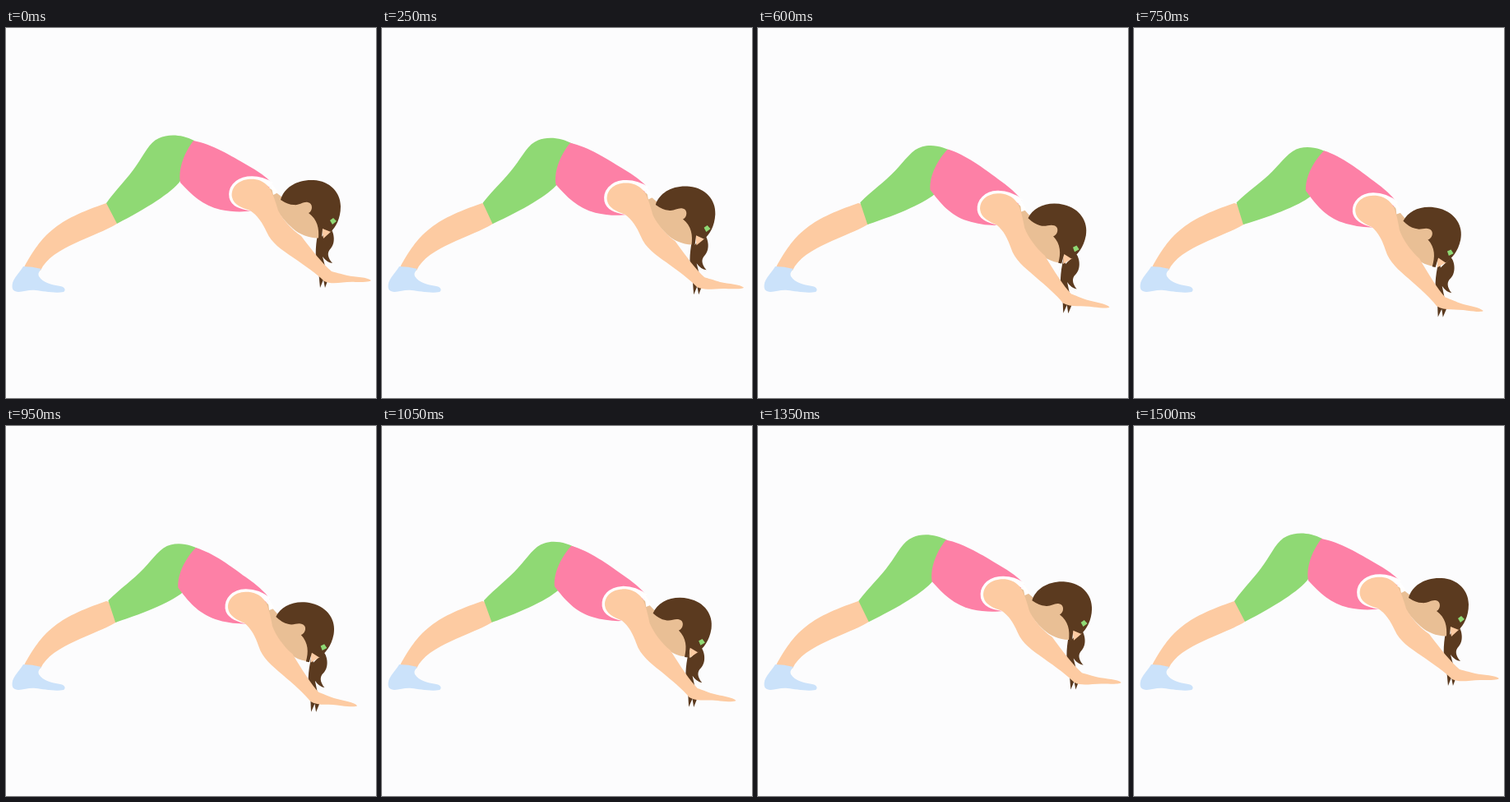
Animation of 450 by 450 pixels, one loop 1550 ms. Source, as an HTML page:

```html
<!DOCTYPE html>
<html lang="en">
<head>
<meta charset="utf-8">
<title>Stretch</title>
<style>
  html, body { margin: 0; height: 100%; overflow: hidden; background: #fcfcfd; }
  svg { display: block; width: 100%; height: 100%; }
  .skin { fill: #fdcba2; }
  .shade { fill: #e9bf95; }
  .hair { fill: #5b3a1f; }
  .green { fill: #8fd974; }
  .pink { fill: #fd80a6; }
  .sock { fill: #cbe2fa; }
  .strap { fill: none; stroke: #fff; stroke-width: 7; }
</style>
</head>
<body>
<svg viewBox="0 0 450 450">
  <path class="skin" d="M22 291C44 251 60 234 122 213L132 216L135 238C110 254 55 266 42 295Z"/>
  <path class="sock" d="M21 290Q32 290 43 293Q38 298 40 302C45 310 55 312 66 314C72 315 73 319 70 321C60 323 45 320 36 319C28 318 22 321 15 321C7 320 7 316 8 310C10 303 17 297 21 290Z"/>
  <path id="thigh" class="green" d="M122 213C134 196 148 183 158 168C168 154 174 139 186 134C197 129 213 129 229 137L222 170L212 186C202 200 170 220 135 238Z"/>
  <path id="pony" class="hair" d="M380 246C377 260 375 277 379 292C381 300 381 308 382 316L386 306L388 316L392 305L385 278Q390 285 397 286C391 279 390 273 395 268C402 260 398 246 394 243L382 256Z"/>
  <g id="body">
    <g id="head">
      <path class="shade" d="M316 192Q328 199 340 209L374 210L383 238L384 255C372 257 358 252 349 244Q336 233 326 216Z"/>
      <path class="skin" d="M384 243L396 247L386 256Z"/>
      <path class="hair" d="M334 209C338 194 354 184 374 185C394 186 407 200 407 217C407 232 401 242 395 248L385 244L384 256L380 256C381 244 379 233 368 225C373 223 374 213 367 212C361 211 357 216 350 215Q343 215 334 209Z"/>
      <path class="green" d="M394 234L398 231L402 235L397 239Z"/>
    </g>
    <path class="pink" d="M228 137C250 141 275 156 292 166Q314 178 324 189L300 222C290 224 275 224 261 221C239 216 226 203 212 188C209 170 218 150 228 137Z"/>
    <path class="strap" d="M323 191C312 184 302 183 294 184C280 186 273 196 275 206C277 214 285 217 298 219"/>
    <path fill="#fff" d="M321 186L331 200L325 203Z"/>
    <path class="skin" d="M320 194C312 184 302 183 294 184C280 186 273 196 275 206C277 215 287 219 297 222C306 228 312 237 317 248C323 262 336 270 349 279C365 290 378 299 387 308C398 313 410 308 425 309C433 309 442 309 444 307C440 303 425 303 415 301C407 299 400 297 396 296C386 288 372 270 359 253C347 245 336 232 331 222C328 212 325 202 320 194Z"/>
  </g>
</svg>
<script>
  const LOOP = 1550, STEP = 50, LOWEST = 790, RETURN = 1520;
  const [thigh, pony, body, head] =
    ['thigh', 'pony', 'body', 'head'].map(id => document.getElementById(id));
  const ease = u => (1 - Math.cos(Math.PI * u)) / 2;
  const place = (part, angle, x, y, dx = 0, dy = 0) =>
    part.setAttribute('transform', `translate(${dx} ${dy}) rotate(${angle} ${x} ${y})`);

  function bend(t) {
    if (t < LOWEST) return ease(t / LOWEST);
    return 1 - ease(Math.min(1, (t - LOWEST) / (RETURN - LOWEST)));
  }

  function draw(now) {
    const b = bend(Math.floor(now % LOOP / STEP) * STEP);
    place(thigh, 10.5 * b, 128, 227);
    place(body, 7 * b, 129, 168);
    place(head, 5 * b, 321, 210);
    // the ponytail follows the head but keeps hanging almost straight down
    place(pony, 3 * b, 386, 252, -9 * b, 36 * b);
  }

  const start = performance.now();
  function tick() {
    draw(performance.now() - start);
    requestAnimationFrame(tick);
  }
  tick();
</script>
</body>
</html>
```
